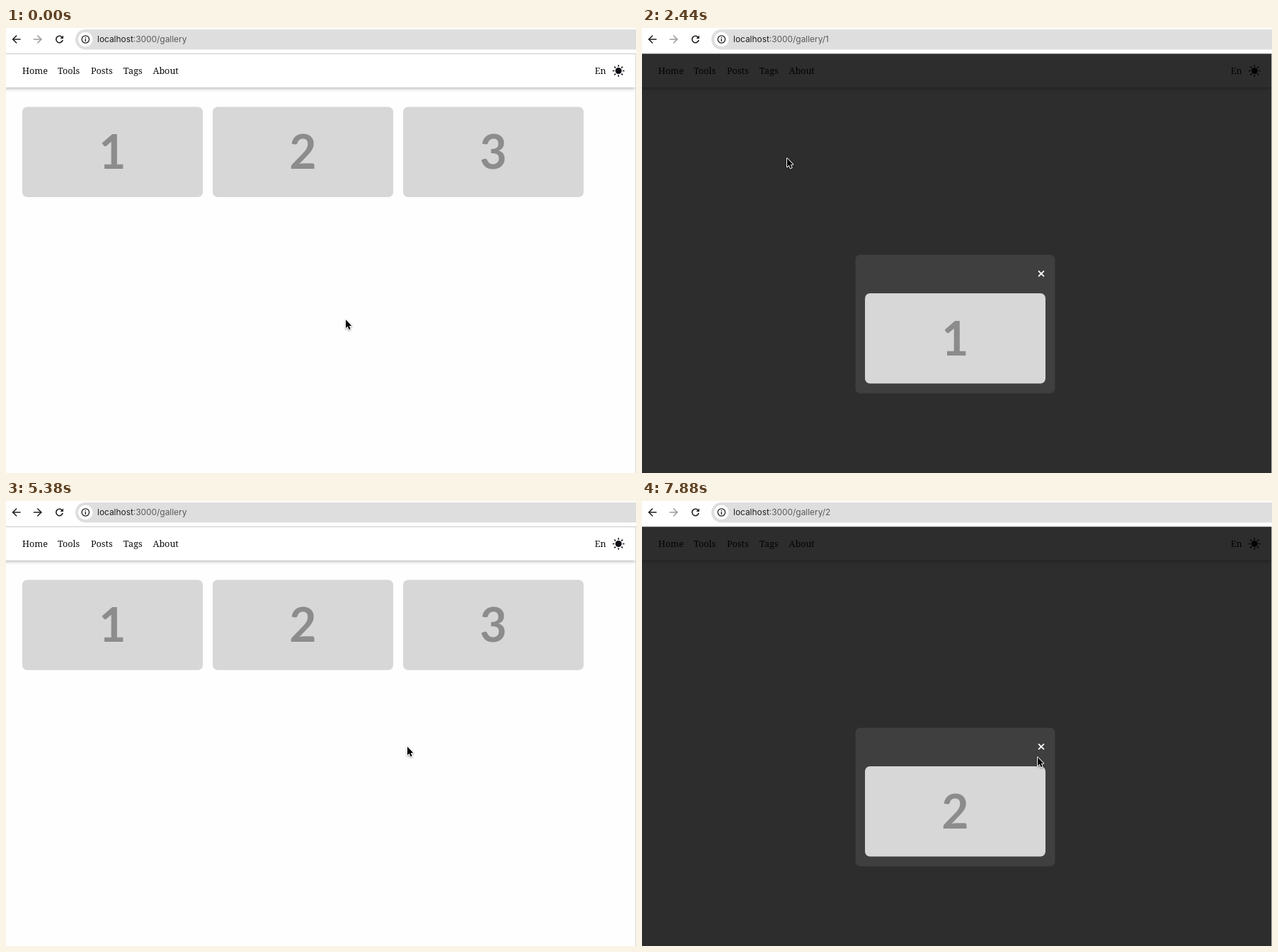
Recreate the animation shown at these times as an HTML page with a canvas. Size 890 by 629 pixels, loop 8 s.

```html
<!DOCTYPE html>
<html lang="en">
<head>
<meta charset="utf-8">
<title>Gallery</title>
<style>
html, body { margin: 0; width: 100%; height: 100%; overflow: hidden; background: #fff; }
canvas { display: block; width: 890px; height: 629px; }
</style>
</head>
<body>
<canvas id="stage" width="890" height="629"></canvas>
<script>
const ctx = document.getElementById('stage').getContext('2d');
const LOOP = 8000;
const NAV_FONT = '12.6px "Noto Serif", serif';
const URL_FONT = '11.9px Inter, sans-serif';
const CARD = { w: 255, h: 127.5, y: 111.5, xs: [23, 292, 561] };

// Each route becomes current at time t.
const scenes = [
  { t: 0, view: 'gallery', path: '' },
  { t: 2130, view: 'loading', path: '/1' },
  { t: 2440, view: 'modal', path: '/1', id: 1 },
  { t: 5380, view: 'gallery', path: '', forward: true },
  { t: 7130, view: 'modal', path: '/2', id: 2 }
];

// Pointer moves: start, end, steps, then the points passed through.
const moves = [
  [60, 500, 7, [479, 411], [350, 300], [232.5, 207]],
  [690, 810, 3, [232.5, 207], [231.5, 173]],
  [1060, 1190, 3, [231.5, 173], [204, 183]],
  [3060, 3190, 3, [204, 183], [369, 289.5]],
  [3440, 3560, 3, [369, 289.5], [435, 317]],
  [3810, 4560, 11, [435, 317], [385, 240], [347.5, 173.5], [400, 215], [475, 295], [521, 336.5]],
  [4630, 4940, 6, [521, 336.5], [566, 346]],
  [5940, 6560, 11, [566, 346], [530, 285], [496.5, 229]],
  [6750, 6880, 3, [496.5, 229], [452.5, 188]],
  [7440, 7880, 7, [452.5, 188], [558, 361]]
];

const handShape = new Path2D('M4.7 8.8L3.3 2.6Q3 .9 4.2 .7Q5.3 .6 5.6 1.8L6.6 5.5Q7.6 4.7 8.7 5.7' +
  'Q9.9 4.9 10.9 6Q12.4 5.6 12.9 7Q13.8 10 12.6 12L12.2 14.4H6.4L5.8 13.2Q3 11 1 8.6' +
  'Q.5 7.1 2 7.1Q3 7.3 4.7 8.8Z');
const handLines = new Path2D('M7.3 9.5V12.2M9.1 9.5V12.2M10.9 9.5V12.2');
const arrowShape = new Path2D('M0 0V12L2.7 9.5L4.6 13.9L6.6 13L4.8 8.8L8.3 8.6Z');

const clamp = v => Math.max(0, Math.min(1, v));

function pointerAt(t) {
  let pos = moves[0][3];
  for (const [start, end, steps, ...pts] of moves) {
    if (t < start) break;
    const step = Math.floor((t - start) / (end - start) * (steps - 1) + 1e-6) + 1;
    const u = clamp(step / steps);
    const s = (u * 0.5 + u * u * (3 - 2 * u) * 0.5) * (pts.length - 1);
    const i = Math.min(Math.floor(s), pts.length - 2);
    pos = [0, 1].map(k => pts[i][k] + (pts[i + 1][k] - pts[i][k]) * (s - i));
  }
  return pos;
}

const inside = (p, x, y, w, h) => p[0] >= x && p[0] <= x + w && p[1] >= y && p[1] <= y + h;

function box(x, y, w, h, r, fill) {
  ctx.fillStyle = fill;
  ctx.beginPath();
  ctx.roundRect(x, y, w, h, r);
  ctx.fill();
}

function line(color, width, ...pts) {
  ctx.strokeStyle = color;
  ctx.lineWidth = width;
  ctx.beginPath();
  pts.forEach(([x, y], i) => i ? ctx.lineTo(x, y) : ctx.moveTo(x, y));
  ctx.stroke();
}

function disc(x, y, r, fill) {
  ctx.fillStyle = fill;
  ctx.beginPath();
  ctx.arc(x, y, r, 0, Math.PI * 2);
  ctx.fill();
}

function text(str, x, y, font, fill, align = 'left') {
  ctx.font = font;
  ctx.fillStyle = fill;
  ctx.textAlign = align;
  ctx.fillText(str, x, y);
  return ctx.measureText(str).width;
}

function card(x, y, id, alpha = 1) {
  ctx.globalAlpha = alpha;
  box(x, y, CARD.w, CARD.h, 7, '#d7d7d7');
  text(id, x + CARD.w / 2, y + 87.5, 'bold 66px Lato, sans-serif', '#8c8c8c', 'center');
  ctx.globalAlpha = 1;
}

function toolbar(scene) {
  box(0, 0, 890, 36, 0, '#fff');
  box(0, 36, 890, 1, 0, '#d2d2d2');
  const ink = '#1f1f1f', next = scene.forward ? ink : '#9b9b9b';
  line(ink, 1.6, [20, 16], [9.8, 16]);
  line(ink, 1.6, [14.7, 11], [9.7, 16], [14.7, 21]);
  line(next, 1.6, [39.5, 16], [49.7, 16]);
  line(next, 1.6, [44.8, 11], [49.8, 16], [44.8, 21]);

  ctx.strokeStyle = ink;
  ctx.beginPath();
  ctx.arc(75.5, 16, 4.7, 0.35, 5.6);
  ctx.stroke();
  ctx.fillStyle = ink;
  ctx.beginPath();
  ctx.moveTo(81, 10.5);
  ctx.lineTo(81, 15);
  ctx.lineTo(76.5, 15);
  ctx.fill();

  box(98, 2, 820, 28.5, 14.2, '#dedede');
  disc(112.3, 16, 10.3, '#fff');
  ctx.lineWidth = 1.3;
  ctx.beginPath();
  ctx.arc(112.3, 16, 5.2, 0, Math.PI * 2);
  ctx.stroke();
  box(111.6, 15.2, 1.4, 3.7, 0, ink);
  box(111.6, 12.9, 1.4, 1.4, 0, ink);

  const w = text('localhost', 129, 20.4, URL_FONT, ink);
  text(':3000/gallery' + scene.path, 129 + w, 20.4, URL_FONT, '#595959');
}

function header() {
  ctx.save();
  ctx.shadowColor = 'rgba(0,0,0,.3)';
  ctx.shadowBlur = 5;
  ctx.shadowOffsetY = 1.5;
  box(-10, 37, 899, 47, 0, '#fff');
  ctx.restore();
  [['Home', 23], ['Tools', 73], ['Posts', 120], ['Tags', 165.7], ['About', 207.5], ['En', 831.7]]
    .forEach(([word, x]) => text(word, x, 65.2, NAV_FONT, '#0c0c0c'));

  disc(865.3, 60.5, 4.5, '#0d0d16');
  for (let i = 0; i < 8; i++) {
    const c = Math.cos(i * Math.PI / 4), s = Math.sin(i * Math.PI / 4);
    line('#0d0d16', 1.7, [865.3 + c * 6.5, 60.5 + s * 6.5], [865.3 + c * 7.6, 60.5 + s * 7.6]);
  }
}

function modal(id, hot) {
  box(0, 36.5, 889.2, 593, 0, 'rgba(0,0,0,.823)');
  box(301.5, 320.5, 282, 196, 7, '#3f3f3f');
  card(315, 375, id);
  const ink = hot ? '#cfcfcf' : '#fff';
  line(ink, 1.8, [560.6, 343.8], [567.4, 350.6]);
  line(ink, 1.8, [567.4, 343.8], [560.6, 350.6]);
}

function pointer([x, y], hand) {
  ctx.save();
  ctx.lineJoin = 'round';
  ctx.shadowColor = 'rgba(0,0,0,.4)';
  ctx.shadowBlur = 2.5;
  ctx.shadowOffsetY = 1;
  if (hand) {
    ctx.translate(x - 4.5, y + 0.7);
    ctx.fillStyle = '#fff';
    ctx.fill(handShape);
    ctx.shadowColor = 'transparent';
    ctx.strokeStyle = '#000';
    ctx.lineWidth = 1;
    ctx.stroke(handShape);
    ctx.lineWidth = 0.8;
    ctx.stroke(handLines);
  } else {
    ctx.translate(x + 1, y + 1.3);
    ctx.strokeStyle = '#fff';
    ctx.lineWidth = 1.9;
    ctx.stroke(arrowShape);
    ctx.shadowColor = 'transparent';
    ctx.fillStyle = '#000';
    ctx.fill(arrowShape);
  }
  ctx.restore();
}

function draw(t) {
  const scene = scenes.filter(s => s.t <= t).pop();
  const pos = pointerAt(t);
  let hand = false;
  ctx.lineCap = 'round';
  ctx.lineJoin = 'miter';
  box(0, 0, 890, 629, 0, '#fefefe');
  toolbar(scene);
  header();
  box(889, 37, 1, 592, 0, '#d9d9d9');

  if (scene.view === 'gallery') {
    const entered = [440, 6500, Infinity];
    CARD.xs.forEach((x, i) => {
      const over = inside(pos, x, CARD.y, CARD.w, CARD.h);
      hand = hand || over;
      card(x, CARD.y, i + 1, over ? 1 - 0.16 * clamp((t - entered[i]) / 300) : 1);
    });
  } else if (scene.view === 'loading') {
    text('Loading home...', -8, 99.3, '13.6px "Liberation Sans", Arial, sans-serif', '#000');
  } else {
    hand = inside(pos, 554, 337, 20, 20);
    modal(scene.id, hand);
  }
  pointer(pos, hand);
}

const began = performance.now();
function tick() {
  draw((performance.now() - began) % LOOP);
  requestAnimationFrame(tick);
}
tick();
</script>
</body>
</html>
```
